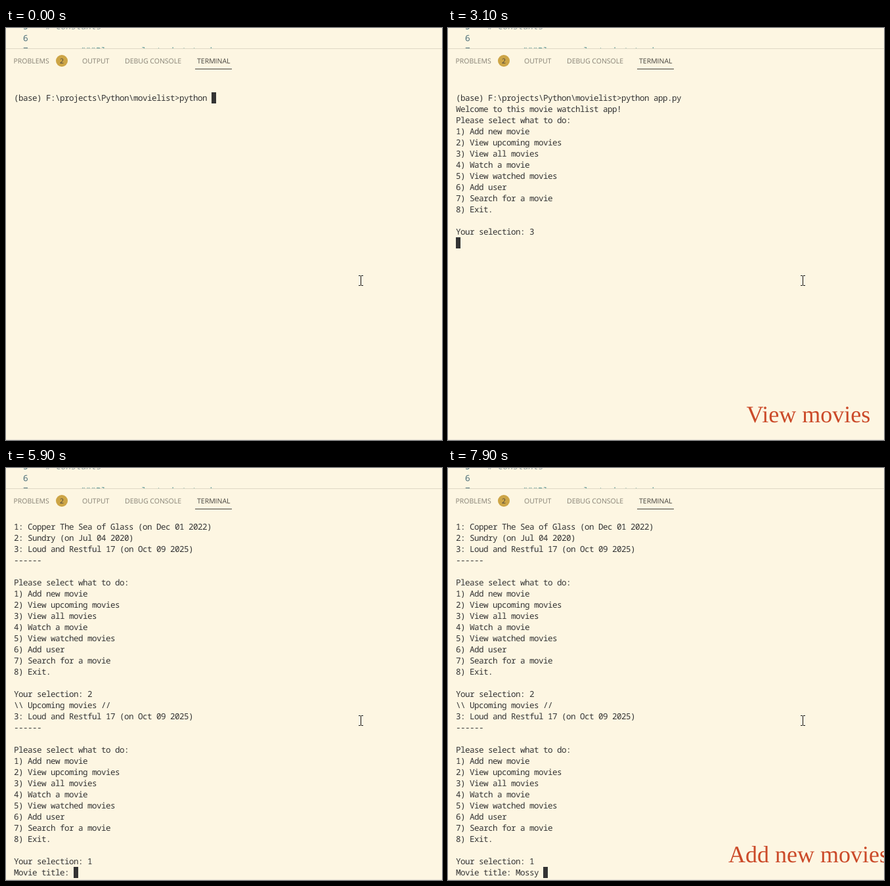
An HTML page for the animation above (8 s loop, 664 by 628 pixels).

```html
<!DOCTYPE html>
<html lang="en">
<head>
<meta charset="utf-8">
<title>Movie watchlist terminal</title>
<style>
  html, body { margin: 0; width: 100%; height: 100%; overflow: hidden; background: #fdf6e2; }
  #stage { position: absolute; left: 0; top: 0; width: 664px; height: 628px; overflow: hidden; }
  svg { position: absolute; left: 0; top: 0; }
  text, pre { white-space: pre; text-rendering: geometricPrecision; }
  .code { font: 12.83px "Noto Sans Mono", monospace; }
  .num { fill: #4b6d78; }
  .tab { font: 10.5px "Open Sans", sans-serif; fill: #858074; }
  .tab.on { fill: #45423c; }
  .caption { font: 36px "Liberation Serif", "Times New Roman", serif; fill: #cb4a29; }
  /* the terminal grid is 7px wide, a little tighter than the font */
  #term {
    position: absolute; left: 12px; top: 81px; margin: 0;
    font: 12.6px/17px "Noto Sans Mono", monospace;
    letter-spacing: calc(7px - 1ch); color: #333;
  }
  #block { position: absolute; width: 7px; height: 17px; background: #333; }
</style>
</head>
<body>
<div id="stage">
  <svg width="664" height="628">
    <defs><clipPath id="editor"><rect width="664" height="31"/></clipPath></defs>
    <g class="code" clip-path="url(#editor)">
      <text class="num" x="26" y="1.5">5</text>
      <text class="num" x="26" y="20">6</text>
      <text class="num" x="26" y="38.5">7</text>
      <text x="60" y="1.5" fill="#93a1a1" font-style="italic"># Constants</text>
      <text x="60" y="38.5" fill="#4f8f90">menu = """Please select what to do:</text>
    </g>
    <rect y="31" width="664" height="1" fill="#ded8c5"/>
    <rect y="627" width="664" height="1" fill="#e9e4d8"/>
    <text class="tab" x="11.5" y="54">PROBLEMS</text>
    <circle cx="85" cy="50" r="9" fill="#cda546"/>
    <text class="tab on" x="85" y="54" text-anchor="middle">2</text>
    <text class="tab" x="116" y="54">OUTPUT</text>
    <text class="tab" x="181" y="54">DEBUG CONSOLE</text>
    <text class="tab on" x="291" y="54">TERMINAL</text>
    <rect x="288" y="62" width="56" height="1" fill="#45423c"/>
  </svg>
  <pre id="term"></pre>
  <div id="block"></div>
  <svg width="664" height="628">
    <path d="M537 377.5h3M541 377.5h3M540.5 378v14M537 392.5h3M541 392.5h3" stroke="#111" fill="none"/>
    <text id="view" class="caption" x="454.5" y="601">View movies</text>
    <text id="add" class="caption" x="427" y="601">Add new movies</text>
  </svg>
</div>
<script>
const LOOP = 8000, ROWS = 32, CELL = 7, LINE = 17, LEFT = 12, TOP = 81;

const menu = `Please select what to do:
1) Add new movie
2) View upcoming movies
3) View all movies
4) Watch a movie
5) View watched movies
6) Add user
7) Search for a movie
8) Exit.

Your selection: `;

const movies = [
  "1: Copper The Sea of Glass (on Dec 01 2022)",
  "2: Sundry (on Jul 04 2020)",
  "3: Loud and Restful 17 (on Oct 09 2025)"
];

const listing = (title, rows) =>
  `\\\\ ${title} movies //\n${rows.join("\n")}\n------\n\n${menu}`;

// [time in ms, text added to the terminal]
const output = [
  [0, "\n(base) F:\\projects\\Python\\movielist>python "],
  [300, "a"], [400, "p"], [500, "p"],
  [700, "."], [800, "p"], [900, "y"], [1100, "\n"],
  [1500, "Welcome to this movie watchlist app!\n" + menu],
  [2300, "3"], [2900, "\n"],
  [3900, listing("All", movies)],
  [4000, "2"],
  [4800, "\n" + listing("Upcoming", movies.slice(2))],
  [5900, "1\nMovie title: "],
  [7500, "M"], [7600, "o"], [7700, "s"], [7800, "sy"], [7900, " "]
];

const get = id => document.getElementById(id);
const term = get("term"), block = get("block");
const captions = [[get("view"), 2000, 4800], [get("add"), 6200, LOOP]];

function draw(t) {
  const text = output.filter(([at]) => at <= t).map(([, s]) => s).join("");
  const lines = text.split("\n").slice(-ROWS);
  const shown = lines.join("\n");
  if (term.textContent !== shown) term.textContent = shown;
  const last = lines.length - 1;
  block.style.left = LEFT + CELL * lines[last].length + "px";
  block.style.top = TOP + LINE * last + "px";
  for (const [el, from, to] of captions)
    el.style.visibility = t >= from && t < to ? "visible" : "hidden";
}

const start = performance.now();
function tick() {
  draw((performance.now() - start) % LOOP);
  requestAnimationFrame(tick);
}
tick();
</script>
</body>
</html>
```
